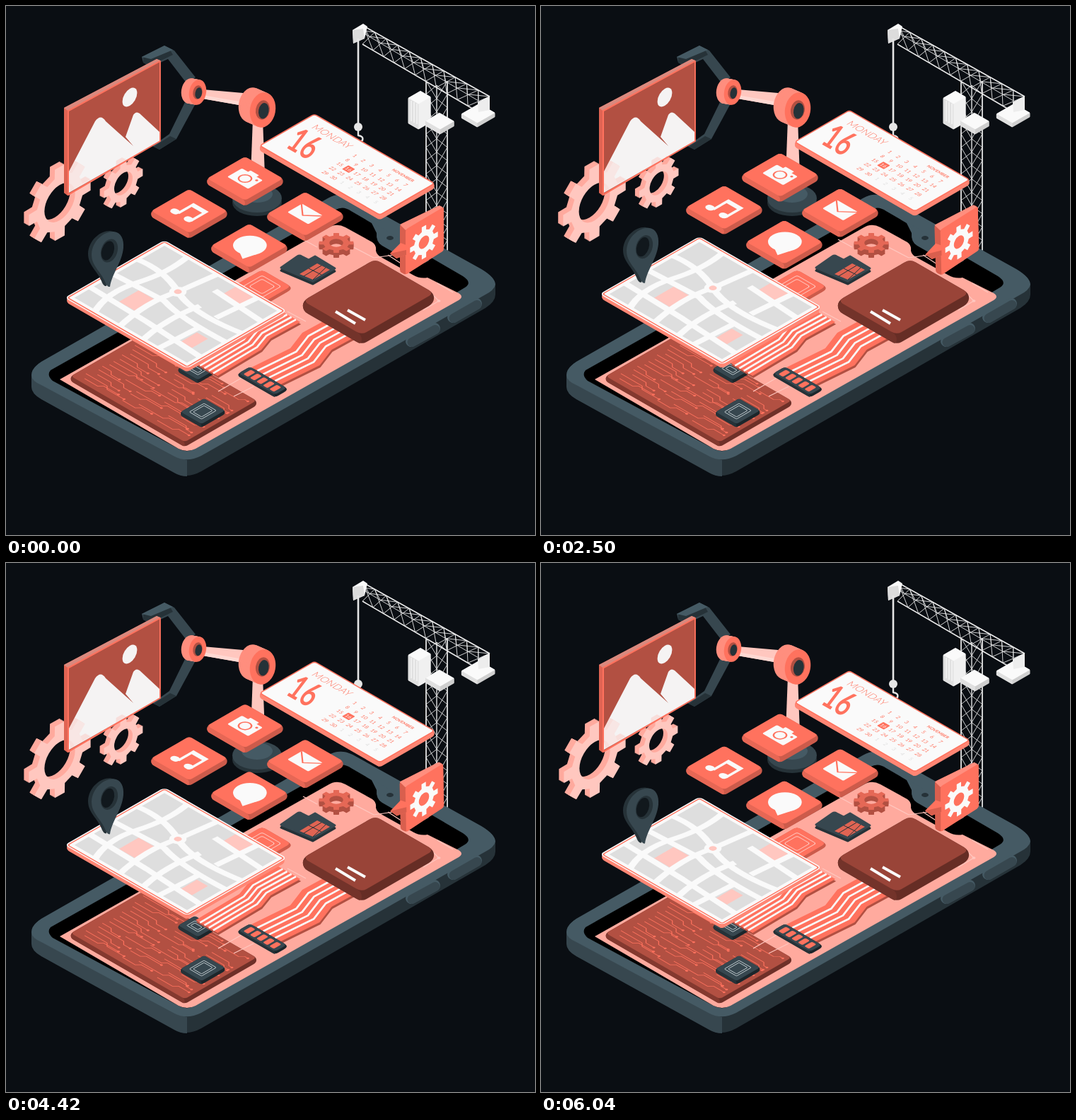
These frames come from a looping animation (748x748 px, 6080 ms). An HTML page:

```html
<!DOCTYPE html>
<html lang="en">
<head>
<meta charset="utf-8">
<title>App building</title>
<style>
  html, body { margin: 0; height: 100%; overflow: hidden; background: #0a0e13; }
  svg { display: block; width: 100%; height: 100%; }
  text { font-family: Lato, "Open Sans", sans-serif; fill: #ff725e; }
</style>
</head>
<body>
<svg id="stage" viewBox="0 0 748 748"></svg>
<script>
const CORAL = '#ff725e', PINK = '#ffaa9e', PALE = '#ffc7bf', RUST = '#b25042', WHITE = '#fafafa';
const D1 = '#455a64', D2 = '#37474f', D3 = '#263238', BG = '#0a0e13', STEEL = '#e6e6e6';
const C = .866;

const path = (d, fill, extra = '') => `<path d="${d}" fill="${fill}" ${extra}/>`;
const line = (d, color, w = 1, extra = '') =>
  path(d, 'none', `stroke="${color}" stroke-width="${w}" stroke-linejoin="round" ${extra}`);
const ell = (x, y, rx, ry, fill, extra = '') =>
  `<ellipse cx="${x}" cy="${y}" rx="${rx}" ry="${ry}" fill="${fill}" ${extra}/>`;
const rect = (x, y, w, h, fill, r = 0, extra = '') =>
  `<rect x="${x}" y="${y}" width="${w}" height="${h}" rx="${r}" fill="${fill}" ${extra}/>`;
const floor = (x, y, s) => `<g transform="matrix(${C} .5 -${C} .5 ${x} ${y})">${s}</g>`;
const wall = (x, y, s) => `<g transform="matrix(${C} -.5 0 1 ${x} ${y})">${s}</g>`;
const range = (n, f) => Array.from({ length: n }, (_, i) => f(i)).join('');

// Polygon with rounded corners
function round(p, r) {
  const at = (a, b) => {
    const k = Math.min(.5, r / Math.hypot(b[0] - a[0], b[1] - a[1]));
    return [a[0] + (b[0] - a[0]) * k, a[1] + (b[1] - a[1]) * k];
  };
  return p.map((a, i) => `${i ? 'L' : 'M'}${at(a, p.at(i - 1))}Q${a} ${at(a, p[(i + 1) % p.length])}`).join('') + 'Z';
}

// Isometric block; (x, y) is the far corner of its top
function slab(x, y, a, b, h, r, top, left, right, extra = '') {
  const R = [x + C * a, y + a / 2], L = [x - C * b, y + b / 2];
  const B = [x + C * (a - b), y + (a + b) / 2], low = p => [p[0], p[1] + h];
  return path(round([[x, y], R, low(R), low(B), low(L), L], r), right)
    + path(round([L, B, low(B), low(L)], Math.min(r, h / 2)), left)
    + path(round([[x, y], R, B, L], r), top, extra);
}

function gear(n, R, r, hole) {
  const step = 2 * Math.PI / n, pts = [];
  for (let i = 0; i < n; i++)
    for (const [k, q] of [[-.28, r], [-.2, R], [.2, R], [.28, r]])
      pts.push([q * Math.cos((i + k) * step), q * Math.sin((i + k) * step)].map(v => v.toFixed(2)));
  return `M${pts.join('L')}ZM${hole} 0A${hole} ${hole} 0 1 0 ${-hole} 0A${hole} ${hole} 0 1 0 ${hole} 0Z`;
}
const solidGear = (plane, x, y, d, dx, dy, front, side) =>
  range(8, i => plane(x + dx * (1 - i / 8), y + dy * (1 - i / 8), path(d, side, 'fill-rule="evenodd"')))
  + plane(x, y, path(d, front, 'fill-rule="evenodd"'));

// Crossed braces between two chords
function truss(a, b, c, d, n) {
  const mix = (p, q, k) => [p[0] + (q[0] - p[0]) * k, p[1] + (q[1] - p[1]) * k];
  let s = `M${a}L${b}M${c}L${d}`;
  for (let i = 0; i < n; i++) {
    const k = i / n, m = (i + 1) / n;
    s += `M${mix(a, b, k)}L${mix(c, d, m)}M${mix(c, d, k)}L${mix(a, b, m)}`;
  }
  return s;
}

let seed = 7;
const rnd = () => (seed = seed * 16807 % 2147483647) / 2147483647;

function crane() {
  const boom = truss([505, 28], [684, 128], [504, 54], [668, 150], 11)
    + truss([505, 28], [684, 128], [498, 34], [668, 134], 11);
  const mast = truss([594, 106], [594, 350], [609, 112], [609, 358], 13)
    + truss([609, 112], [609, 358], [624, 106], [624, 350], 13);
  return line(boom + mast, STEEL, .9)
    + line('M594 106V350M624 106V350M505 28L684 128M504 54L668 150', STEEL, 1.6)
    + path('M490 34L505 25L511 29L507 46L491 53Z', WHITE) + path('M490 34L505 32L507 46L491 53Z', '#dcdcdc')
    + slab(586, 120, 17, 20, 36, 1, WHITE, '#e0e0e0', '#f0f0f0')
    + line('M573 134V163M577 136V165M581 138V167', '#fff', 1)
    + slab(613, 151, 24, 23, 7, 1, WHITE, '#e0e0e0', '#cfcfcf')
    + slab(669, 138, 26, 29, 6, 1, WHITE, '#e0e0e0', '#d0d0d0')
    + path('M667 136L684 127V147L668 150Z', '#ededed')
    + line('M498 46V166', STEEL, 2.6) + ell(498, 171, 6, 6, STEEL)
    + line('M498 176V183Q506 184 504 190Q499 194 495 188', STEEL, 2.4);
}

function phone() {
  const edge = 'M36 522Q36 512 50 503L455 272Q472 262 490 271L672 372Q692 384 692 ';
  return path(edge + '396V408Q692 418 678 427L276 658Q256 669 238 660L50 556Q36 548 36 538Z', D3)
    + path('M36 522L50 535L238 637L256 642V665Q246 665 238 660L50 556Q36 548 36 538Z', D2)
    + path(edge + '394Q690 402 678 408L276 636Q256 646 238 637L50 536Q36 530 36 522Z', D1)
    + path('M63 515L466 288Q477 282 488 290L646 382Q660 391 649 398L268 625Q256 633 244 626L66 530Q57 522 63 515Z', '#000')
    + path('M76 528L455 314Q467 306 480 313L518 334Q524 338 523 346Q524 352 532 356L575 380Q585 386 596 384L640 406Q648 411 640 416L268 626Q256 632 244 626Z', PINK)
    + path('M516 305L524 321Q523 334 532 339L574 363Q586 368 598 360L598 352Z', D1)
    + ell(543, 328, 5, 3, D3)
    + ['M573 474L606 456', 'M632 440L665 421'].map(d =>
        line(d, D1, 16, 'stroke-linecap="round"') + line(d, D2, 13, 'stroke-linecap="round" transform="translate(1 1.5)"')).join('');
}

function board() {
  const traces = range(14, i => {
    const y = 5 + i * 8;
    let x = 6 + rnd() * 20, s = '';
    while (x < 150) {
      const a = 14 + rnd() * 30, b = 8 + rnd() * 22, j = rnd() < .5 ? 5 : -5;
      const end = Math.min(x + a + 5 + b, 180), mid = Math.min(x + a, 170), to = Math.max(4, Math.min(113, y + j));
      s += line(`M${x} ${y}H${mid}L${mid + 5} ${to}H${end}`, CORAL, 1) + ell(end, to, 1.7, 1.7, CORAL);
      x = end + 5 + rnd() * 16;
    }
    return s;
  });
  const chip = (x, y, a, b, h) => slab(x, y, a, b, h, 3, D2, D3, '#1c262b')
    + floor(x, y, [7, 10].map(k => rect(k, k, a - 2 * k, b - 2 * k, 'none', 1, 'stroke="#cfd8dc" stroke-width=".8"')).join(''));
  return slab(193, 465, 186, 117, 7, 5, RUST, '#84392f', '#6f3028')
    + floor(193, 465, traces)
    + chip(280, 555, 34, 38, 5) + chip(267, 499, 32, 27, 5);
}

// Flat cable: coral band with white strands
function ribbon(x, y, mid, w, n) {
  const [u, v] = [w * C, w / 2];
  const back = mid.map(([a, b]) => `l${-a} ${-b}`).reverse().join('');
  const run = mid.map(p => `l${p}`).join('');
  const band = `M${x} ${y}${run}l${u} ${v}${back}Z`;
  return path(band, RUST, 'transform="translate(1 3)"') + path(band, CORAL)
    + range(n, i => line(`M${x + u * (i + 1) / (n + 1)} ${y + v * (i + 1) / (n + 1)}${run}`, WHITE, 2.7));
}

function screenParts() {
  const faint = line('M300 545L345 519M322 552L350 538M380 500L398 489M470 330L520 356L548 352M590 430L612 417L600 405M540 352L560 365M610 392L632 405M398 432L424 446M420 330L440 341', PALE, 1.2)
    + ell(398, 489, 2.5, 1.8, PALE) + ell(384, 499, 2.5, 1.8, PALE) + ell(612, 417, 2.5, 1.8, PALE);
  const rings = floor(362, 373, [8, 13].map(k =>
    rect(k, k, 47 - 2 * k, 47 - 2 * k, 'none', 3, `stroke="${PALE}" stroke-width="1.1"`)).join(''));
  const sim = 'M389 370L412 354Q415 352 418 354L428 359L437 354L465 371L434 389Z';
  return faint
    + slab(362, 373, 47, 47, 5, 6, CORAL, '#e06453', '#cc5b4b') + rings
    + ribbon(268, 505, [[62, -37], [13, -16], [42, -23]], 36, 4)
    + ribbon(347, 511, [[55, -27], [17, -22], [33, -18]], 48, 4)
    + slab(345, 510, 60, 19, 4, 5, D2, D3, '#1c262b')
    + floor(345, 510, range(5, i => rect(5 + i * 10.6, 3.5, 7.5, 12.5, CORAL, 2)))
    + line(sim, D3, 3, 'transform="translate(0 4)"') + path(sim, D3, 'transform="translate(0 4)"')
    + line(sim, D2, 3) + path(sim, D2)
    + path('M415 379L440 364L458 373L434 387Z', '#e06453')
    + line('M421 382L446 367M428 371L446 380M434 387L452 370', D3, 1)
    + solidGear(floor, 467, 335, gear(8, 20, 15, 8), 0, 7, '#e56856', RUST)
    + slab(522, 358, 96, 118, 14, 9, '#994438', '#73332a', '#662d25')
    + line('M483 430L508 444M466 432L494 449', WHITE, 4);
}

function picture() {
  const hill = 'M89 234L126 163Q134 152 141 163L180 198L169 185L180 154Q184 148 189 152L217 178V191L89 264Z';
  return `<clipPath id="hill">${path(hill, '#000')}</clipPath>`
    + path('M82 144L213 75L218 77V191L88 268L82 264Z', CORAL)
    + path('M82 144L213 75L218 77L87 148Z', '#d9897e') + path('M82 144L87 148V268L82 264Z', '#e06453')
    + path('M89 149L217 79V190L89 265Z', RUST) + path(hill, '#f5f3f3')
    + `<g clip-path="url(#hill)"><use href="#cogs" opacity=".28"/></g>`
    + line('M88 148L218 78V191L88 267Z', CORAL, 1.8)
    + wall(175, 129, ell(0, 0, 12, 12, '#f5f3f3'));
}

const cogs = `<g id="cogs">`
  + solidGear(wall, 76, 278, gear(8, 51, 38, 25), -7, -4, PALE, PINK)
  + solidGear(wall, 166, 251, gear(8, 32, 24, 15), -6, -3, PALE, PINK) + '</g>';

function arm() {
  const joint = (x, y, rx, ry, dx, dy) => {
    const tilt = `transform="rotate(10 ${x} ${y})"`;
    return range(8, i => `<g transform="translate(${-dx * (1 - i / 8)} ${-dy * (1 - i / 8)})">${ell(x, y, rx, ry, '#ff8e7e', tilt)}</g>`)
      + ell(x, y, rx, ry, CORAL, tilt) + ell(x, y, rx * .55, ry * .55, RUST, tilt) + ell(x + 1.5, y + 1, rx * .4, ry * .45, D3, tilt);
  };
  return ell(355, 278, 35, 19, D3) + ell(355, 272, 35, 20, D2) + ell(355, 266, 22, 12, D1)
    + path('M349 160H363L366 240H346Z', PALE)
    + path('M278 118L335 123V141L278 131Z', PALE) + path('M278 126L335 136V141L278 131Z', '#ffd9d3')
    + path('M192 72L224 56L238 63L268 101L256 110L229 75L205 86L194 80Z', D2)
    + path('M194 73L232 62L236 69L205 84L194 80Z', D3) + path('M192 72L224 56L236 62L205 75Z', D1)
    + path('M256 130L268 138L241 188L217 203L207 198L231 181Z', D2) + path('M232 184L241 188L217 203L209 199Z', D3)
    + joint(271, 122, 12, 18, 11, 2) + joint(363, 147, 18, 25, 16, 7);
}

function bubble() {
  return path(round([[557, 309], [613, 282], [619, 285], [619, 345], [565, 380], [557, 376]], 3), '#d95f4e')
    + path('M557 309L613 282L619 286L565 317Z', '#ff8e7e')
    + path(round([[565, 316], [619, 284], [619, 346], [565, 380]], 3), CORAL)
    + path('M543 350L558 335L566 338V352L552 357Z', CORAL) + path('M543 350L566 345V352L552 357Z', '#d95f4e')
    + wall(591, 334, path(gear(8, 23, 16.5, 8.5), WHITE, 'fill-rule="evenodd"'));
}

function calendar() {
  let days = '';
  for (let i = 0; i < 35; i++) {
    const x = i % 7 * 13.8, y = Math.floor(i / 7) * 12.1, today = i === 15;
    if (today) days += rect(x - 5.5, y - 8, 11, 10.5, CORAL, 1);
    days += `<text x="${x}" y="${y}" font-size="7.4" text-anchor="middle" style="fill:${today ? '#fff' : i > 29 ? '#ddd' : CORAL}">${i > 29 ? i - 29 : i + 1}</text>`;
  }
  return slab(436, 153, 196, 89, 7, 4, WHITE, '#ff8674', '#ff8674', `stroke="${CORAL}" stroke-width="1.6"`)
    + floor(431, 172, '<text font-size="13.8" font-weight="300">MONDAY</text>')
    + `<g transform="matrix(.7 .4 -.72 .95 394 199)"><text font-size="42" font-weight="700">16</text></g>`
    + floor(491, 213, days)
    + floor(545, 232, '<text font-size="6" font-weight="700">NOVEMBER</text>');
}

function tiles() {
  const box = rect(-17, -12, 34, 24, WHITE, 2);
  const icons = [
    [338, 244, box + rect(-7, -16, 14, 6, WHITE, 1) + ell(0, 0, 8.5, 8.5, CORAL) + ell(0, 0, 6.5, 6.5, WHITE)
      + ell(12, -7, 1.8, 1.8, CORAL)],
    [259, 290, ell(-11, 12, 6, 5, WHITE) + ell(11, 12, 6, 5, WHITE) + path('M-8 12V-15H17V12H13V-8H-4V12Z', WHITE)],
    [423, 294, box + line('M-17 -11L0 4L17 -11', CORAL, 1.8)],
    [344, 339, ell(0, -1, 19.5, 19.5, WHITE) + path('M1 17L13 24L18 6Z', WHITE)]
  ];
  return icons.map(([x, y, s]) =>
    slab(x, y - 31, 62, 62, 8, 5, CORAL, '#e66755', '#cc5b4b') + floor(x, y, s)).join('');
}

function map() {
  const roads = 'M0 48Q40 40 82 60T196 66M82 60L90 0M82 60Q70 100 84 159M40 0Q48 40 36 80T44 159M0 88L84 84Q120 96 196 92'
    + 'M120 62Q110 110 122 159M150 66L156 0M0 125L100 128L196 134M150 92L146 159M110 28L196 34';
  const blocks = rect(48, 90, 28, 32, '#ffc7c0') + rect(122, 6, 29, 23, '#ffc7c0') + rect(155, 102, 18, 26, '#ffc7c0');
  return slab(224, 333, 196, 159, 7, 4, '#dedede', '#ff8674', '#ff8674')
    + floor(224, 333, blocks + line(roads, WHITE, 8.5) + rect(2, 2, 192, 155, 'none', 2, `stroke="${WHITE}" stroke-width="8"`)
      + ell(82, 60, 10, 10, WHITE) + ell(82, 60, 4.5, 4.5, '#ffc7c0')
      + rect(.5, .5, 195, 158, 'none', 3, `stroke="${CORAL}" stroke-width="1.6"`));
}

function pin() {
  const drop = 'M147 397Q143 398 140 390C134 375 121 368 121 351C122 332 138 319 152 319C163 320 167 330 166 342C164 363 150 378 147 397Z';
  return path(drop, D3, 'transform="translate(-5 -1)"') + path(drop, D2)
    + ell(146, 346, 11.5, 17, D3, 'transform="rotate(18 146 346)"')
    + ell(144, 346, 8.5, 14, '#11181d', 'transform="rotate(18 144 346)"');
}

const stage = document.getElementById('stage');
stage.innerHTML = rect(0, 0, 748, 748, BG) + crane() + phone() + board() + screenParts()
  + cogs + arm() + picture() + `<g id="bubble">${bubble()}</g>`
  + `<g id="float">${calendar() + tiles() + map() + pin()}</g>`;

const LOOP = 6080, HALF = LOOP / 2;
const beat = [[0, 1], [620, 1.1], [1950, 1], [2430, 1], [2950, 1.1], [3790, 1], [LOOP, 1]];
function beatAt(t) {
  const i = beat.findIndex(k => k[0] > t), [a, p] = beat[i - 1], [b, q] = beat[i];
  return p + (q - p) * (t - a) / (b - a);
}
const move = (id, v) => document.getElementById(id).setAttribute('transform', v);

function draw(now) {
  const t = now % LOOP, lift = 15 * (1 - Math.abs(1 - 2 * (t % HALF) / HALF));
  move('float', `translate(0 ${-lift})`);
  move('cogs', `translate(110 275) scale(${beatAt(t)}) translate(-110 -275)`);
  move('bubble', `rotate(${2 * Math.sin(2 * Math.PI * t / 1520)} 584 333)`);
  requestAnimationFrame(draw);
}
draw(performance.now());
</script>
</body>
</html>
```
